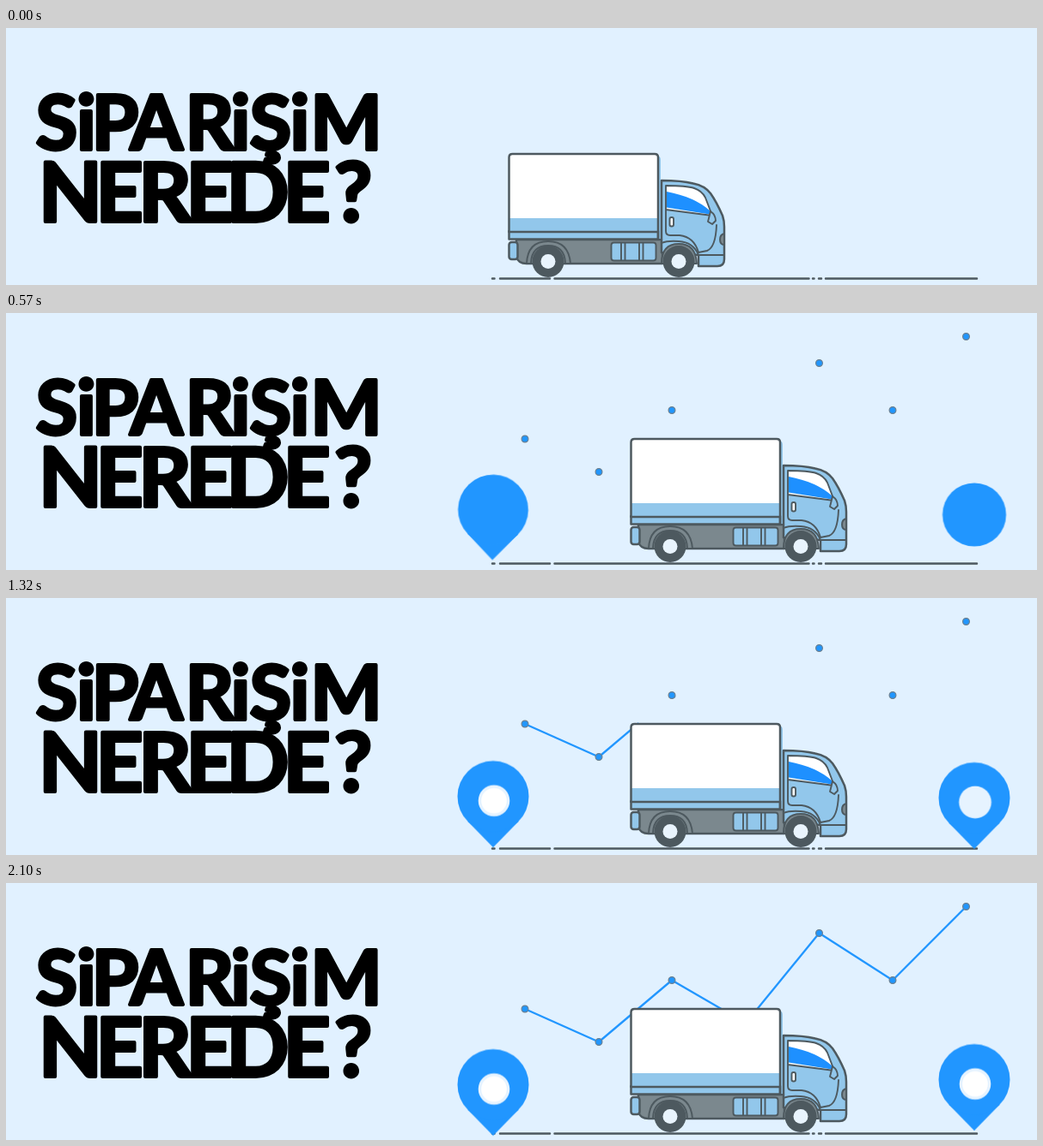
Animation, 1200 px wide and 300 px high, one loop 2130 ms. Source, as an HTML page:

```html
<!DOCTYPE html>
<html lang="tr">
<head>
<meta charset="utf-8">
<title>Siparişim nerede?</title>
<style>
  html, body { margin: 0; width: 100%; height: 100%; overflow: hidden; background: #e1f1ff; }
  svg { display: block; width: 100vw; height: 100vh; }

  .title { font-family: Lato, "Open Sans", sans-serif; font-weight: 700; text-anchor: middle;
    stroke: #000; stroke-width: 4; stroke-linejoin: round; }
  .ink { stroke: #4d595f; stroke-width: 2.5; stroke-linejoin: round; stroke-linecap: round; }
  .fine { stroke-width: 1.9; }
  .line { fill: none; }
  .sky { fill: #92c7eb; }
  .grey { fill: #7b888e; }
  .white { fill: #fff; }
  .pin { fill: #2196ff; }

  .truck, .dots circle, .chart, .chart path, .late, .pin * {
    animation: 2130ms linear infinite backwards; }

  .truck { animation-name: drive; animation-timing-function: steps(15, end); }
  @keyframes drive { 0% { transform: none; } 21.127%, 100% { transform: translateX(142px); } }

  .dots circle { fill: #2196ff; stroke: #6c7f8e; stroke-width: 1.2;
    transform-box: fill-box; transform-origin: center; animation-name: dot; }
  @keyframes dot { 0%, 7.04% { transform: scale(0); } 23%, 100% { transform: none; } }

  /* Gates keep delayed parts hidden at the start of every loop. */
  .chart { animation-name: chart-gate; }
  .late { animation-name: late-gate; }
  @keyframes chart-gate { 0%, 50.22% { opacity: 0; } 50.23%, 100% { opacity: 1; } }
  @keyframes late-gate { 0%, 14.08% { opacity: 0; } 14.09%, 100% { opacity: 1; } }

  .chart path { fill: none; stroke: #2196ff; stroke-width: 2.3; stroke-dasharray: 1 2;
    animation-name: trace; animation-delay: calc(var(--i) * 120ms); }
  @keyframes trace { 0%, 50.23% { stroke-dashoffset: 1; } 61.5%, 100% { stroke-dashoffset: 0; } }

  .late .pin * { animation-delay: 300ms; }

  .pin .bob { animation-name: bob; animation-timing-function: cubic-bezier(.37, 0, .63, 1); }
  @keyframes bob {
    0%, 28.169%, 56.338%, 84.507% { transform: translateY(-3px); }
    14.085%, 42.254%, 70.423%, 98.592%, 100% { transform: translateY(3px); }
  }
  .pin .pop { animation-name: pop; }
  @keyframes pop {
    0%, 8.92% { transform: rotate(0deg) scale(0); animation-timing-function: ease-out; }
    16.2% { transform: rotate(0deg) scale(1.26); animation-timing-function: ease-in-out; }
    23.47% { transform: rotate(5deg) scale(.92); animation-timing-function: ease-in-out; }
    28.17%, 100% { transform: rotate(0deg) scale(1); }
  }
  .pin .tip { animation-name: tip; }
  @keyframes tip { 0%, 18.5% { transform: scale(.65); } 23.94%, 100% { transform: scale(1); } }

  .pin .hole { fill: #e6f3ff; animation-name: hole; }
  @keyframes hole {
    0%, 28.17% { transform: scale(0); animation-timing-function: ease-out; }
    36.6% { transform: scale(1.12); }
    52.1%, 100% { transform: scale(1); }
  }
  .pin .core { fill: #fff; animation-name: core; }
  @keyframes core {
    0%, 50.7% { transform: scale(0); animation-timing-function: ease-out; }
    60.1%, 100% { transform: scale(1); }
  }
</style>
</head>
<body>
<svg viewBox="0 0 1200 300">
  <defs>
    <g id="wheel">
      <circle r="18.5" fill="#4d595f"/>
      <circle r="8.5" fill="#e9f4fd"/>
    </g>
  </defs>

  <text class="title" font-size="88" y="141.5" x="59 93.5 127 175 237 273 308 342 396">SiPARiŞiM</text>
  <text class="title" font-size="96" y="226" x="75 132 185 237 293 350 404">NEREDE?</text>

  <path class="ink line"
    d="M566 292.5h2.5M575 292.5h58M638.5 292.5h296M939 292.5h1.5M946 292.5h3M954 292.5h176"/>

  <g class="chart">
    <path pathLength="1" style="--i:0" d="M604 147L690 185.5"/>
    <path pathLength="1" style="--i:1" d="M690 185.5L775 113.5"/>
    <path pathLength="1" style="--i:2" d="M775 113.5L861 163.5"/>
    <path pathLength="1" style="--i:3" d="M861 163.5L946.5 58.5"/>
    <path pathLength="1" style="--i:4" d="M946.5 58.5L1032 113.5"/>
    <path pathLength="1" style="--i:5" d="M1032 113.5L1117.5 27.5"/>
  </g>
  <g class="dots">
    <circle cx="604" cy="147" r="3.9"/>
    <circle cx="690" cy="185.5" r="3.9"/>
    <circle cx="775" cy="113.5" r="3.9"/>
    <circle cx="861" cy="163.5" r="3.9"/>
    <circle cx="946.5" cy="58.5" r="3.9"/>
    <circle cx="1032" cy="113.5" r="3.9"/>
    <circle cx="1117.5" cy="27.5" r="3.9"/>
  </g>

  <g class="truck">
    <!-- chassis -->
    <path class="ink grey" d="M594 247H764V275H606Q596 275 594 267Z"/>
    <rect class="ink sky" x="585.5" y="250" width="10" height="20" rx="3"/>
    <path class="ink grey fine" d="M606 275Q607 249 631 249T657 275Z"/>
    <path class="ink line fine" d="M611 274Q612 254 631 254T651 274"/>
    <rect class="ink sky fine" x="704.5" y="250.5" width="52" height="21" rx="3"/>
    <path class="ink line fine" d="M716 251V271M720.5 251V271M737 251V271M741.5 251V271"/>
    <!-- cargo box -->
    <path class="sky" d="M757 149Q762 149 762 154V246H757Z"/>
    <path class="ink sky" d="M585.5 237H759V246.5H585.5Z"/>
    <rect class="white" x="585.5" y="147" width="173.5" height="90" rx="4"/>
    <path class="sky" d="M586 222H759V238H586Z"/>
    <path class="ink line" d="M585.5 238V151Q585.5 147 589.5 147H755Q759 147 759 151V246M586 238H759"/>
    <!-- cab -->
    <path class="ink sky" d="M763 247V178Q786 178 800 181.5Q813 184 820 193Q827 203 834 219Q836 225 836 232V270Q836 278 828 278H806V265L763 262Z"/>
    <path class="white" d="M768 184Q792 184 801 187Q810 190 814 198L822 219L768 212Z"/>
    <path fill="#1e90ff" d="M769 191Q801 197 819 213V217.5L769 209.5Z"/>
    <path class="ink line fine" d="M768 237V184Q792 184 801 187Q810 190 814 198L822 219L768 212M768 237Q768 242 773 242H784Q801 244 806 262L816 260Q826 256 827 230"/>
    <path class="ink line fine" d="M763 251Q770 248 783 249Q800 250 806 265H835"/>
    <path class="ink sky fine" d="M820 214Q826 218 826 225L822 229L817 226Z"/>
    <rect class="ink white fine" x="772.5" y="221" width="4.5" height="10.5" rx="2"/>
    <path class="ink grey fine" d="M836 240Q831 241 831 247T836 253Z"/>
    <path class="ink grey fine" d="M763 275Q763 252 783 252T804 275Z"/>
    <use href="#wheel" x="631" y="272.5"/>
    <use href="#wheel" x="783" y="272.5"/>
  </g>

  <g class="pin" transform="translate(567 232.5)">
    <g class="bob"><g class="pop">
      <path class="tip" d="M-29.7 28.9L0 59.5L29.7 28.9L0 0Z"/>
      <circle r="41.5"/>
      <g transform="translate(1 5)"><circle class="hole" r="18.3"/><circle class="core" r="14.8"/></g>
    </g></g>
  </g>
  <g class="late">
    <g class="pin" transform="translate(1127 232.5)">
      <g class="bob"><g class="pop">
        <path class="tip" d="M-29.7 28.9L0 59.5L29.7 28.9L0 0Z"/>
        <circle r="41.5"/>
        <g transform="translate(1 5)"><circle class="hole" r="18.3"/><circle class="core" r="14.8"/></g>
      </g></g>
    </g>
  </g>
</svg>
</body>
</html>
```
